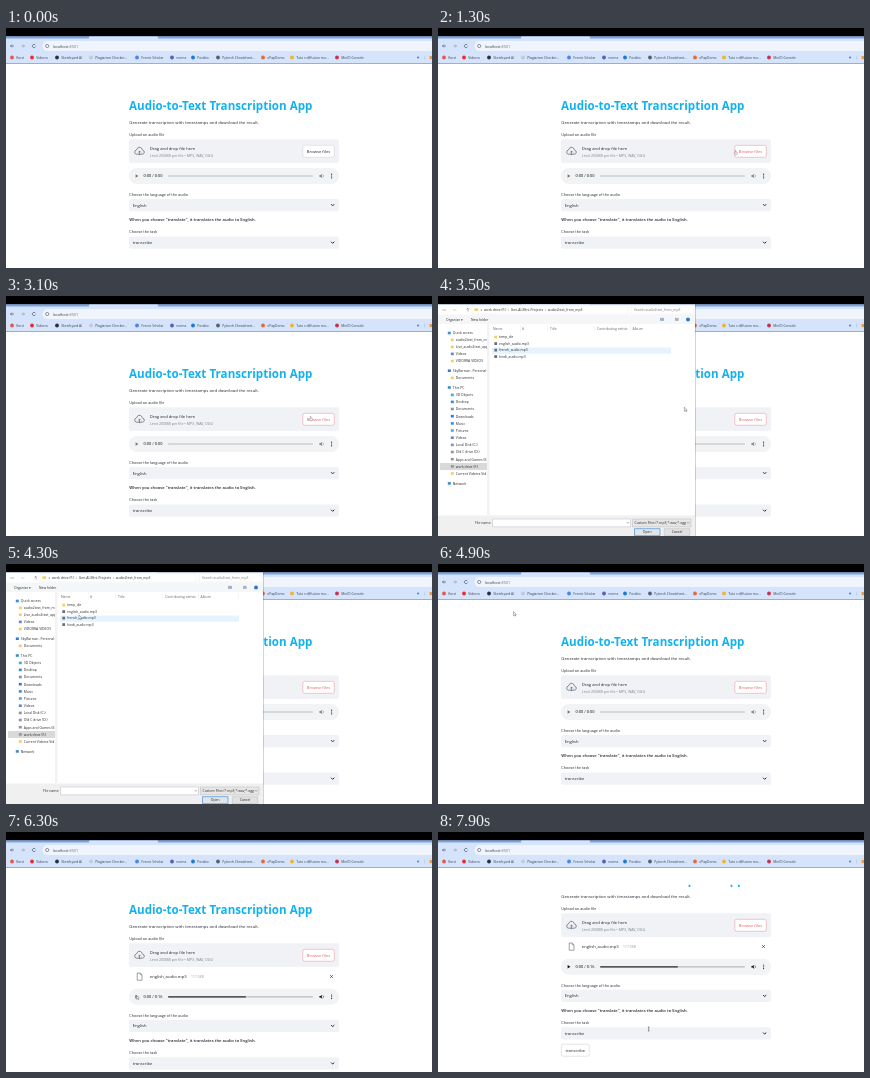
Recreate the animation shown at these times as an HTML page with a canvas. Size 426 by 240 pixels, loop 8000 ms.

```html
<!DOCTYPE html>
<html lang="en">
<head>
<meta charset="utf-8">
<title>Audio-to-Text Transcription App</title>
<style>
html, body { margin: 0; width: 100%; height: 100%; overflow: hidden; background: #fff; }
canvas { display: block; width: 426px; height: 240px; }
</style>
</head>
<body>
<canvas id="stage" width="426" height="240"></canvas>
<script>
const ctx = document.getElementById('stage').getContext('2d');
const LOOP = 8000, INK = '#242630', GREY = '#7f828c', PANEL = '#f0f2f6', RED = '#e85a58';
const SANS = '"Open Sans", sans-serif';

// Text is set large and scaled down so that small sizes keep their true advances.
function text(str, x, y, size, color = INK, { weight = 400, align = 'left', font = SANS } = {}) {
  ctx.save();
  ctx.translate(x, y);
  ctx.scale(0.1, 0.1);
  ctx.font = `${weight} ${size * 10}px ${font}`;
  ctx.textAlign = align;
  ctx.fillStyle = color;
  ctx.fillText(str, 0, 0);
  ctx.restore();
}
function rect(x, y, w, h, color) {
  ctx.fillStyle = color;
  ctx.fillRect(x, y, w, h);
}
function box(x, y, w, h, r, fill, stroke, width = 0.5) {
  ctx.beginPath();
  ctx.roundRect(x, y, w, h, r);
  paint(fill, stroke, width);
}
function dot(x, y, r, fill) {
  ctx.beginPath();
  ctx.arc(x, y, r, 0, 7);
  paint(fill);
}
function shape(points, fill, stroke, width = 0.5, closed = true) {
  ctx.beginPath();
  points.forEach(([x, y]) => ctx.lineTo(x, y));
  if (closed) ctx.closePath();
  paint(fill, stroke, width);
}
const line = (points, color, width) => shape(points, null, color, width, false);
function paint(fill, stroke, width) {
  if (fill) { ctx.fillStyle = fill; ctx.fill(); }
  if (stroke) { ctx.strokeStyle = stroke; ctx.lineWidth = width; ctx.stroke(); }
}
function clipped(x, y, w, h, draw) {
  ctx.save();
  ctx.beginPath();
  ctx.rect(x, y, w, h);
  ctx.clip();
  draw();
  ctx.restore();
}

const bookmarks = [
  [6, '#e25a4e', 'Korvi'], [26, '#f02a2a', 'Vidorra'], [51, '#28303c', 'Sketchyard AI'],
  [85, '#c3cad6', 'Plagiarism Checker...'], [131, '#4a86e8', 'Fennic Scholar'], [166, '#5560c0', 'rooms'],
  [187, '#1f78d0', 'Postbix'], [212, '#56616e', 'Pytorch Cheatsheet...'], [257, '#e8683c', 'ePapDomo'],
  [286, '#f0b52c', 'Tuto s diffusion mo...'], [331, '#c8344c', 'MinIO Console']
];

function browser() {
  rect(0, 0, 426, 36, '#d5e4fb');
  rect(0, 0, 426, 8.5, '#000');
  rect(0, 8.5, 426, 2, '#7ba4ea');
  box(83, 8.5, 69, 3.5, 1, '#d5e4fb');
  line([[8, 18], [4.5, 18], [6, 16.5]], '#3f4c62', 0.6);
  line([[4.5, 18], [6, 19.5]], '#3f4c62', 0.6);
  line([[15, 18], [18.5, 18], [17, 16.5]], '#8795ab', 0.6);
  line([[18.5, 18], [17, 19.5]], '#8795ab', 0.6);
  ctx.beginPath();
  ctx.arc(28, 18, 1.6, 0.4, 5.7);
  paint(null, '#3f4c62', 0.7);
  box(36.5, 13, 400, 10, 5, '#eff4fd');
  ctx.beginPath();
  ctx.arc(41.2, 18, 1.6, 0, 7);
  paint(null, '#4c5869', 0.6);
  text('localhost', 46.8, 19.5, 3.75, '#353d4a');
  text(':8501', 62.5, 19.5, 3.75, '#6b7585');
  for (const [x, color, label] of bookmarks) {
    dot(x, 29.5, 1.9, color);
    text(label, x + 4.3, 30.9, 3.3, '#363f4e');
  }
  dot(412, 29.5, 1, '#3d7be0');
  rect(418.6, 27.5, 0.5, 4, '#9db8e2');
  rect(423.5, 28, 2.5, 3.2, '#ee9a45');
  rect(0, 35.2, 426, 0.7, '#8d98a9');
}

function cloud(x, y) {
  ctx.beginPath();
  ctx.arc(x - 2.7, y + 1.1, 2.1, 1.57, 4.5);
  ctx.arc(x, y - 1, 2.7, 3.5, 6.1);
  ctx.arc(x + 2.8, y + 1.2, 2, 4.9, 7.85);
  ctx.closePath();
  paint(null, '#757a87', 0.9);
  line([[x, y + 4.2], [x, y], [x - 1.4, y + 1.4]], '#757a87', 0.8);
  line([[x, y], [x + 1.4, y + 1.4]], '#757a87', 0.8);
}
function select(label, value, y) {
  text(label, 123.3, y, 3.74);
  box(123, y + 3.2, 210, 12.2, 2, PANEL);
  text(value, 126.7, y + 10.8, 4.2);
  line([[325.1, y + 8.4], [326.7, y + 10], [328.3, y + 8.4]], INK, 1);
}
function button(label, x, y, w, hot) {
  box(x, y, w, 12, 1.8, '#fff', hot ? '#e5a3a1' : '#d0d2d8', 0.6);
  text(label, x + w / 2, y + 7.5, 4.2, hot ? RED : INK, { align: 'center' });
}
function player(y, loaded) {
  const ink = loaded ? '#111' : '#777';
  box(123, y - 8, 210, 16, 8, '#f1f3f4');
  shape([[129.6, y - 1.7], [132.4, y], [129.6, y + 1.7]], ink);
  text(loaded ? '0:00 / 0:16' : '0:00 / 0:00', 137.5, y + 1.4, 4, '#222', { font: 'Roboto, sans-serif' });
  box(162, y - 0.6, 145, 1.2, 0.6, '#b9bbbd');
  if (loaded) box(162, y - 0.6, 78, 1.2, 0.6, '#333');
  shape([[313.4, y - 0.7], [314.5, y - 0.7], [315.8, y - 1.9], [315.8, y + 1.9], [314.5, y + 0.7], [313.4, y + 0.7]], ink);
  ctx.beginPath();
  ctx.arc(315.8, y, 1.7, -1, 1);
  paint(null, ink, 0.5);
  for (const dy of [-1.8, 0, 1.8]) dot(325.6, y + dy, 0.6, '#222');
}

function page(t) {
  const hot = t >= 1200, hasFile = t >= 5500;
  const scroll = 30 * (1 - (1 - Math.min(1, Math.max(0, (t - 7600) / 300))) ** 2);
  const shift = hasFile ? 16.8 : 0;
  rect(0, 36, 426, 204, '#fff');
  clipped(0, scroll ? 52.8 : 36, 426, 204, () => {
    ctx.translate(0, -scroll);
    text('Audio-to-Text Transcription App', 123, 82.4, 11.63, '#12b2f0', { weight: 700 });
    text('Generate transcription with timestamps and download the result.', 123.3, 96, 4.26);
    text('Upload an audio file', 123.3, 107.7, 3.74);
    box(123, 111.2, 210, 23.8, 2, PANEL);
    cloud(133.5, 123);
    text('Drag and drop file here', 143.8, 121.6, 4.2);
    text('Limit 200MB per file • MP3, WAV, OGG', 143.8, 129, 3.6, GREY);
    button('Browse files', 296.8, 117.3, 31.5, hot);
    if (hasFile) {
      shape([[131.2, 141], [134.2, 141], [136, 142.8], [136, 148.2], [131.2, 148.2]], '#fff', '#757a87', 0.7);
      line([[134.2, 141], [134.2, 142.8], [136, 142.8]], '#757a87', 0.6);
      text('english_audio.mp3', 143.8, 146.1, 4.2);
      text('117.0KB', 185, 146, 3.4, '#9a9da6');
      line([[324.2, 143.2], [326.8, 145.8]], INK, 0.7);
      line([[326.8, 143.2], [324.2, 145.8]], INK, 0.7);
    }
    ctx.translate(0, shift);
    player(148, t >= 5900);
    select('Choose the language of the audio', 'English', 167.8);
    text('When you choose "translate", it translates the audio to English.', 123.3, 193, 4.17, INK, { weight: 600 });
    select('Choose the task', 'transcribe', 205.3);
    if (hasFile) button('transcribe', 123.3, 225.4, 28, false);
  });
}

// label, baseline, icon colour, is a top-level entry
const places = [
  ['Quick access', 38.3, '#3a8ee0', 1], ['audio2text_from_mp3', 45.2, '#f3cf66'], ['Live_audio2text_app', 52.2, '#f3cf66'],
  ['Videos', 59.2, '#6a86c8'], ['VIDORRA VIDEOS', 66.3, '#f3cf66'], ['SkyBarrow - Personal', 76, '#2a7fd4', 1],
  ['Documents', 83.2, '#f3cf66'], ['This PC', 92.8, '#3a8ec8', 1], ['3D Objects', 100.2, '#3fb0d8'],
  ['Desktop', 107.2, '#2f8fd8'], ['Documents', 114.3, '#8796a8'], ['Downloads', 121.5, '#2f7fd0'],
  ['Music', 128.7, '#3a8ee0'], ['Pictures', 135.8, '#5fa6c8'], ['Videos', 143, '#6a86c8'],
  ['Local Disk (C:)', 150.2, '#8d98a3'], ['Old C drive (D:)', 157.3, '#8d98a3'], ['Apps and Games (E:)', 164.5, '#8d98a3'],
  ['work drive (F:)', 171.7, '#8d98a3'], ['Current Vidorra Vid', 178.8, '#f3cf66'], ['Network', 188.7, '#3a8ec8', 1]
];
const files = ['temp_dir', 'english_audio.mp3', 'french_audio.mp3', 'hindi_audio.mp3'];

function dialog(hovered) {
  const small = (str, x, y, color = '#2a2a2a', options) => text(str, x, y, 3.4, color, options);
  rect(257, 8.5, 0.7, 232, 'rgba(0,0,0,.25)');
  rect(0, 8.5, 257, 231.5, '#fff');
  line([[4.5, 14], [8, 14]], '#666', 0.5);
  line([[15, 14], [18.5, 14]], '#aaa', 0.5);
  line([[30, 15.5], [30, 12], [28.6, 13.4]], '#555', 0.5);
  box(34, 9.7, 156, 8.3, 0, '#fff', '#e6e6e6', 0.4);
  rect(36.5, 12.3, 3.4, 2.8, '#f3cf66');
  small('«  work drive (F:)  ›  Gen-AI-Mini-Projects  ›  audio2text_from_mp3', 42.5, 15.1);
  box(193, 9.7, 63, 8.3, 0, '#fff', '#e6e6e6', 0.4);
  small('Search audio2text_from_mp3', 196, 15.1, '#777');
  rect(0, 18.6, 257, 9.4, '#f5f6f7');
  small('Organize ▾', 8, 24.8);
  small('New folder', 33, 24.8);
  rect(222, 21.9, 4, 3, '#9fb4ca');
  rect(237, 21.9, 3.6, 3, '#a8b4c0');
  dot(250, 23.5, 2, '#2a78d0');

  clipped(0, 28, 49, 191, () => {
    rect(2, 167, 47, 7, '#d9d9d9');
    for (const [label, y, color, top] of places) {
      const x = top ? 9.8 : 12.8;
      rect(x, y - 2.6, 3, 2.6, color);
      small(label, x + 5, y);
    }
  });
  rect(49, 28, 2.5, 191, '#f3f3f3');
  [['Name', 55], ['#', 84], ['Title', 112], ['Contributing artists', 159], ['Album', 194.5]]
    .forEach(([label, x]) => small(label, x, 33.5, '#666'));
  for (const x of [82, 109, 156, 192, 232]) rect(x, 29, 0.4, 6.5, '#e8e8e8');
  rect(54, 45 + 6.5 * (hovered - 1), 179, 6.2, '#e5f3ff');
  files.forEach((name, i) => {
    const y = 42.4 + 6.5 * i;
    rect(56.3, y - 2.7, 2.8, 2.8, i ? '#68727e' : '#f3cf66');
    small(name, 61, y);
  });

  rect(0, 219.5, 257, 20.5, '#f0f0f0');
  small('File name:', 37, 228);
  box(54.5, 223, 138, 7.8, 0, '#fff', '#b5bdc8', 0.5);
  line([[188.7, 226.2], [189.8, 227.3], [190.9, 226.2]], '#555', 0.5);
  box(194.5, 223, 58.5, 7.8, 0, '#e6e6e6', '#b8b8b8', 0.5);
  clipped(196, 223, 52, 8, () => small('Custom Files (*.mp3;*.wav;*.ogg)', 196.5, 228));
  line([[249, 226.2], [250.1, 227.3], [251.2, 226.2]], '#555', 0.5);
  box(196.5, 232.7, 25.5, 7, 0, '#e1e5ea', '#4a92d6', 0.7);
  small('Open', 209.2, 237.4, '#222', { align: 'center' });
  box(226.3, 232.7, 25.5, 7, 0, '#e1e1e1', '#b8b8b8', 0.5);
  small('Cancel', 239, 237.4, '#222', { align: 'center' });
}

const path = [
  [100, 418, 212], [1000, 374, 165], [1300, 297.5, 122], [1900, 303, 121], [3100, 304.5, 120], [3300, 304.5, 120],
  [3600, 226, 108], [4200, 73, 51], [4400, 73, 51], [4600, 75.5, 47.5], [4900, 75.5, 47.5], [5400, 126, 130],
  [6000, 133, 161], [6300, 130.3, 163], [6600, 130.3, 163], [7200, 206, 195.5], [7300, 206, 195.5], [7500, 210.7, 197]
];
function cursorAt(t) {
  const next = path.findIndex(key => key[0] > t);
  if (next < 0) return path[path.length - 1].slice(1);
  const [t0, x0, y0] = path[next - 1], [t1, x1, y1] = path[next];
  const u = (t - t0) / (t1 - t0), e = u * u * (3 - 2 * u);
  return [x0 + (x1 - x0) * e, y0 + (y1 - y0) * e];
}
function cursor(t) {
  if (t < path[0][0]) return;
  const [x, y] = cursorAt(t);
  ctx.save();
  ctx.translate(x, y);
  ctx.scale(0.85, 0.85);
  if (t >= 7400) {
    line([[0, -2.3], [0, 2.3]], '#333', 0.6);
    line([[-1, -2.4], [1, -2.4]], '#333', 0.5);
    line([[-1, 2.4], [1, 2.4]], '#333', 0.5);
  } else if (t >= 1300 && t <= 3300) {
    shape([[-0.4, 0.5], [0.4, 0.5], [0.5, 2.4], [2.1, 2.8], [2, 4.6], [1.5, 5.6], [-0.5, 5.6], [-1.6, 3.8], [-1.2, 3.4], [-0.4, 4]],
      '#fff', '#555', 0.4);
  } else {
    shape([[0, 0], [0, 5], [1.2, 3.9], [2, 5.6], [2.7, 5.2], [1.9, 3.7], [3.5, 3.6]], '#fff', '#444', 0.45);
  }
  ctx.restore();
}

function draw() {
  const t = Math.floor(performance.now() % LOOP / 100) * 100;
  ctx.clearRect(0, 0, 426, 240);
  page(t);
  browser();
  if (t >= 3400 && t < 4800) dialog(t < 4500 ? 2 : 1);
  cursor(t);
  requestAnimationFrame(draw);
}
draw();
</script>
</body>
</html>
```
